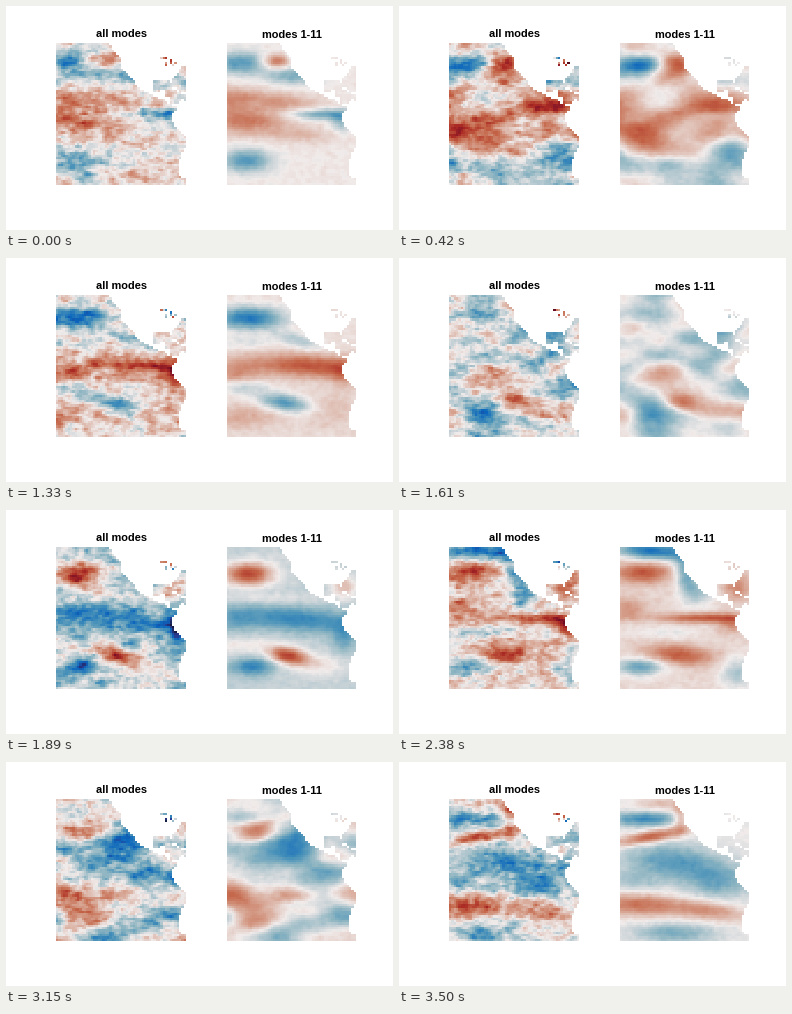
A matplotlib script for the animation above (3570 ms loop, 387x224 px).

```python
import numpy as np
import matplotlib.pyplot as plt
from matplotlib.animation import FuncAnimation
from matplotlib.colors import LinearSegmentedColormap
from matplotlib.path import Path

W, H, DPI = 387, 224, 100
FRAMES, STEP_MS = 51, 70
ROWS, COLS = 61, 56          # two-degree cells, 60N-60S and 180W-70W
PANEL_W, PANEL_H = 130, 142  # panel size in pixels

rng = np.random.default_rng(11)
lon, lat = np.meshgrid(-180 + 2 * np.arange(COLS), 60 - 2 * np.arange(ROWS))
px = (lon + 181) / 2 * PANEL_W / COLS
py = (61 - lat) / 2 * PANEL_H / ROWS

balance = LinearSegmentedColormap.from_list("balance", [
    (0.00, "#171c42"), (0.09, "#293a8f"), (0.18, "#0b66bd"), (0.28, "#4590b9"),
    (0.37, "#8eb5c2"), (0.455, "#d2d8db"), (0.50, "#f1eceb"), (0.545, "#e6d2cc"),
    (0.63, "#d59d89"), (0.72, "#c46548"), (0.82, "#ac2b24"), (0.91, "#780e28"),
    (1.00, "#3c0911")], N=512)


def land_mask():
    """True where a cell lies on land."""
    america = [(-136, 62), (-133, 57), (-130, 53.5), (-125, 49), (-124, 40),
               (-121, 35), (-117, 32), (-113, 27), (-110, 23), (-106, 21),
               (-104, 19), (-96, 15.5), (-92, 14), (-86, 11.5), (-84, 9),
               (-80, 7.3), (-77.5, 7), (-77.5, 3), (-80.5, 0), (-81, -5),
               (-77, -12), (-71, -17), (-69, -20), (-66, -20), (-66, 11.5),
               (-72, 12), (-75, 10.7), (-77, 8.7), (-80, 9.3), (-83, 10),
               (-83.5, 15), (-88, 16), (-87, 21.5), (-90, 21), (-91, 18.5),
               (-95, 18.5), (-97.5, 22), (-97, 27.5), (-94, 29.5), (-85, 30),
               (-82.5, 28), (-81, 25), (-80, 27), (-81, 31), (-76, 35),
               (-74, 40), (-70, 42), (-66, 44), (-66, 62)]
    chile = [(-71, -29), (-73.5, -37), (-75, -45), (-75, -51), (-72, -54),
             (-66, -56), (-66, -29)]
    cells = np.c_[lon.ravel(), lat.ravel()]
    land = Path(america).contains_points(cells) | Path(chile).contains_points(cells)
    land = land.reshape(lon.shape)
    for x, y in [(-80, 22), (-78, 22), (-76, 20), (-72, 18), (-70, 18)]:
        land[(lon == x) & (lat == y)] = True
    return land


def lake_mask():
    lakes = np.zeros(lon.shape, bool)
    for x, y in [(-90, 48), (-88, 48), (-86, 48), (-86, 44), (-86, 42),
                 (-82, 46), (-82, 44), (-80, 42), (-78, 44)]:
        lakes |= (lon == x) & (lat == y)
    return lakes


def blob(x, y, sx, sy, amp, slope=0):
    dx = px - x
    dy = py - y - slope * dx
    return amp * np.exp(-0.5 * ((dx / sx) ** 2 + (dy / sy) ** 2))


def smooth_noise(t, y, x):
    """Unit-variance noise, periodic in time, with a blur width per axis."""
    spectrum = np.fft.fftn(rng.standard_normal((FRAMES, ROWS, COLS)))
    for axis, width in enumerate((t, y, x)):
        shape = [1, 1, 1]
        shape[axis] = -1
        freq = np.fft.fftfreq(spectrum.shape[axis])
        spectrum *= np.exp(-2 * (np.pi * width * freq) ** 2).reshape(shape)
    noise = np.fft.ifftn(spectrum).real
    return noise / noise.std()


# Large-scale state at chosen moments
warm_tongue = (0.02 + blob(14, 20, 18, 8, -.42) + blob(50, 18, 10, 5, .4)
               + blob(67, 33, 20, 6, -.3) + blob(72, 12, 9, 8, -.2)
               + blob(20, 78, 28, 9, .36) + blob(50, 58, 32, 7, .24, .1)
               + blob(4, 57, 14, 9, .22) + blob(95, 71, 24, 4, -.38)
               + blob(115, 79, 8, 8, -.26) + blob(19, 118, 18, 8, -.42)
               + blob(75, 92, 28, 6, .14))

cold_eye = (0.1 + blob(19, 23, 21, 6, -.85, -.12) + blob(46, 34, 14, 7, .4, -.15)
            + blob(60, 20, 8, 12, .26) + blob(28, 5, 30, 6, .16)
            + blob(12, 44, 30, 8, .2) + blob(70, 70, 48, 4, .24)
            + blob(12, 84, 16, 5, .14) + blob(12, 110, 20, 8, .14)
            + blob(45, 86, 14, 5, -.2) + blob(100, 118, 26, 16, -.22)
            + blob(118, 40, 10, 8, .16))

warm_band = (0.05 + blob(22, 23, 24, 8, -.6) + blob(74, 46, 18, 5, -.2, .3)
             + blob(85, 71, 42, 8, .45, .05) + blob(116, 79, 9, 9, .18)
             + blob(8, 78, 20, 9, .22) + blob(58, 108, 18, 6, -.46, .15)
             + blob(15, 92, 18, 5, -.22) + blob(15, 122, 26, 8, .16)
             + blob(105, 115, 20, 12, .1) + blob(20, 47, 24, 5, -.1))

cold_band = (-0.12 + blob(22, 27, 17, 8, .66) + blob(70, 72, 45, 9, -.36, .08)
             + blob(118, 90, 9, 12, -.22) + blob(8, 74, 16, 9, -.16)
             + blob(62, 109, 13, 6, .68, .15) + blob(25, 120, 15, 6, -.38)
             + blob(15, 98, 26, 6, .14) + blob(95, 118, 18, 8, .16)
             + blob(40, 52, 35, 4, .1) + blob(118, 40, 9, 8, .28))

warm_line = (0.07 + blob(33, 4, 26, 6, -.65, .05) + blob(66, 25, 8, 15, -.42, .5)
             + blob(80, 46, 10, 8, -.24) + blob(23, 26, 20, 7, .42)
             + blob(90, 71, 36, 3.5, .42) + blob(112, 78, 9, 6, .2)
             + blob(8, 62, 13, 8, .22) + blob(60, 108, 23, 7, .4, .08)
             + blob(20, 120, 17, 6, -.42) + blob(118, 126, 11, 11, -.26)
             + blob(118, 40, 10, 9, .26) + blob(45, 86, 25, 5, -.1))

slanted = (-0.02 + blob(12, 13, 18, 8, -.2) + blob(42, 25, 18, 5, .48, -.3)
           + blob(46, 40, 26, 7, -.34, -.2) + blob(73, 36, 9, 9, -.26)
           + blob(30, 88, 25, 15, .3) + blob(45, 70, 22, 6, .1)
           + blob(68, 106, 13, 4, -.34) + blob(105, 78, 19, 10, -.32)
           + blob(110, 112, 18, 10, -.14) + blob(25, 124, 28, 8, .13))

cold_basin = (-0.02 + blob(25, 20, 24, 5, -.45) + blob(46, 5, 22, 5, .18)
              + blob(61, 19, 5, 10, .28) + blob(30, 38, 26, 4.5, .5, -.18)
              + blob(55, 63, 36, 13, -.36, .1) + blob(100, 84, 24, 12, -.26)
              + blob(12, 82, 20, 8, -.16) + blob(20, 106, 30, 8, .42, .05)
              + blob(90, 112, 25, 7, .32, .12) + blob(55, 134, 30, 7, -.28))

states = [warm_tongue, cold_eye, warm_band, cold_band, warm_line, slanted, cold_basin]
moments = [0, 12, 19, 27, 34, 40, 50]
coast_boost = [-.1, .1, .25, -.6, .35, -.5, -.15]  # unfiltered coastal signal

land, lakes = land_mask(), lake_mask()
hidden = land & ~lakes
coast = blob(120, 82, 5, 8, 1, .8)

drift = smooth_noise(1.4, 3.2, 6)
fine = smooth_noise(.8, .45, .8)
eddies = smooth_noise(1.0, 1.2, 2.4)
texture = smooth_noise(1.2, .6, .8)


def fields(i):
    k = min(np.searchsorted(moments, i, side="right") - 1, len(moments) - 2)
    u = (i - moments[k]) / (moments[k + 1] - moments[k])
    w = u * u * (3 - 2 * u)
    slow = (1 - w) * states[k] + w * states[k + 1]
    slow = slow + .13 * np.sin(np.pi * u) * drift[i]
    boost = (1 - w) * coast_boost[k] + w * coast_boost[k + 1]
    rough = .065 * fine[i] + .075 * eddies[i]
    full = 1.15 * slow + boost * coast + rough * np.where(lakes, 4, 1)
    few = slow + .014 * texture[i]
    return [np.ma.array(f, mask=hidden) for f in (full, few)]


fig = plt.figure(figsize=(W / DPI, H / DPI), dpi=DPI, facecolor="white")
ax = fig.add_axes([0, 0, 1, 1])
ax.axis("off")


def panel(left, right, field):
    return ax.imshow(field, cmap=balance, vmin=-1, vmax=1, aspect="auto",
                     interpolation="nearest", extent=(left, right, 179, 37))


def title(x, y, text):
    ax.text(x, y, text, family="Liberation Sans", weight="bold",
            size=11 * 72 / DPI, ha="center", va="baseline", color="black")


full, few = fields(0)
panels = [panel(50, 180, full), panel(221, 350, few)]
title(115, 31, "all modes")
title(285.5, 32, "modes 1-11")
ax.set_xlim(0, W)
ax.set_ylim(H, 0)


def update(i):
    for image, field in zip(panels, fields(i)):
        image.set_data(field)
    return panels


anim = FuncAnimation(fig, update, frames=FRAMES, interval=STEP_MS,
                     repeat=True, repeat_delay=0)
plt.show()
```
